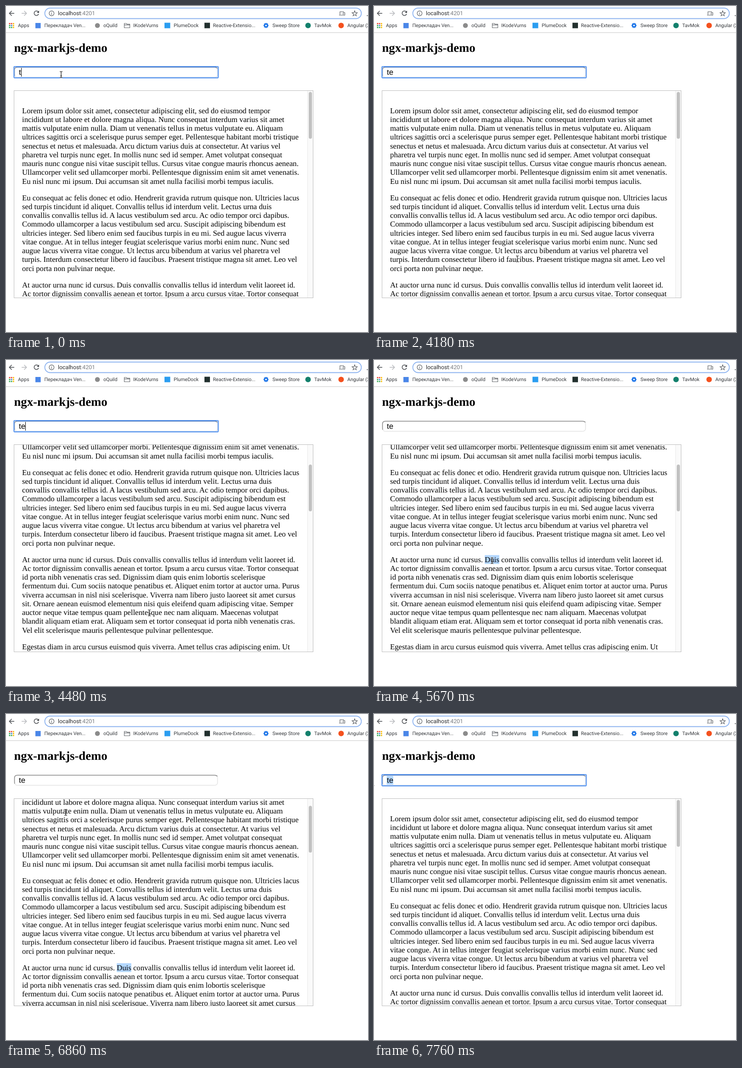
An HTML page with a canvas that plays this animation: 788 by 711 pixels, repeating every 8000 ms.

```html
<!DOCTYPE html>
<html lang="en">
<head>
<meta charset="utf-8">
<title>ngx-markjs-demo</title>
<style>
  html, body { margin: 0; width: 100%; height: 100%; overflow: hidden; background: #fff; }
  canvas { display: block; }
</style>
</head>
<body>
<canvas id="stage" width="788" height="711"></canvas>
<script>
const ctx = document.getElementById('stage').getContext('2d');
const LOOP = 8000;
const SERIF = '16.75px "Liberation Serif", "Times New Roman", serif';
const SANS = '16.75px "Liberation Sans", Arial, sans-serif';
const UI = 'Roboto, sans-serif';
const SELECTION = '#b3d7ff';
const LINE = 19.25;
const GAP = 16.75;

const paragraphs = [
`Lorem ipsum dolor ssit amet, consectetur adipiscing elit, sed do eiusmod tempor
incididunt ut labore et dolore magna aliqua. Nunc consequat interdum varius sit amet
mattis vulputate enim nulla. Diam ut venenatis tellus in metus vulputate eu. Aliquam
ultrices sagittis orci a scelerisque purus semper eget. Pellentesque habitant morbi tristique
senectus et netus et malesuada. Arcu dictum varius duis at consectetur. At varius vel
pharetra vel turpis nunc eget. In mollis nunc sed id semper. Amet volutpat consequat
mauris nunc congue nisi vitae suscipit tellus. Cursus vitae congue mauris rhoncus aenean.
Ullamcorper velit sed ullamcorper morbi. Pellentesque dignissim enim sit amet venenatis.
Eu nisl nunc mi ipsum. Dui accumsan sit amet nulla facilisi morbi tempus iaculis.`,
`Eu consequat ac felis donec et odio. Hendrerit gravida rutrum quisque non. Ultricies lacus
sed turpis tincidunt id aliquet. Convallis tellus id interdum velit. Lectus urna duis
convallis convallis tellus id. A lacus vestibulum sed arcu. Ac odio tempor orci dapibus.
Commodo ullamcorper a lacus vestibulum sed arcu. Suscipit adipiscing bibendum est
ultricies integer. Sed libero enim sed faucibus turpis in eu mi. Sed augue lacus viverra
vitae congue. At in tellus integer feugiat scelerisque varius morbi enim nunc. Nunc sed
augue lacus viverra vitae congue. Ut lectus arcu bibendum at varius vel pharetra vel
turpis. Interdum consectetur libero id faucibus. Praesent tristique magna sit amet. Leo vel
orci porta non pulvinar neque.`,
`At auctor urna nunc id cursus. Duis convallis convallis tellus id interdum velit laoreet id.
Ac tortor dignissim convallis aenean et tortor. Ipsum a arcu cursus vitae. Tortor consequat
id porta nibh venenatis cras sed. Dignissim diam quis enim lobortis scelerisque
fermentum dui. Cum sociis natoque penatibus et. Aliquet enim tortor at auctor urna. Purus
viverra accumsan in nisl nisi scelerisque. Viverra nam libero justo laoreet sit amet cursus
sit. Ornare aenean euismod elementum nisi quis eleifend quam adipiscing vitae. Semper
auctor neque vitae tempus quam pellentesque nec nam aliquam. Maecenas volutpat
blandit aliquam etiam erat. Aliquam sem et tortor consequat id porta nibh venenatis cras.
Vel elit scelerisque mauris pellentesque pulvinar pellentesque.`,
`Egestas diam in arcu cursus euismod quis viverra. Amet tellus cras adipiscing enim. Ut`
].map(p => p.split('\n'));

// Step tracks: each entry holds until the next time.
const pointer = [
  [0, 120, 149], [3430, 127, 163], [3580, 166, 244], [3730, 222, 362], [3880, 274, 470],
  [4030, 304, 536], [4180, 312, 551], [4780, 310, 546], [4930, 297, 518], [5080, 278, 479],
  [5230, 263, 449], [5380, 257, 437], [6270, 250, 424], [6410, 216, 362], [6560, 170, 284],
  [6710, 138, 228], [6860, 130, 214], [7160, 125, 190], [7310, 112, 156], [7460, 72, 152],
  [7610, 22, 150], [7760, -8.8, 146.5]
];
const scrolling = [[0, 0], [4330, 90], [4480, 173], [6560, 160], [6710, 112], [6860, 55], [7010, 14], [7160, 0]];
const caretToggles = [300, 740, 1190, 1340, 1930, 2380, 2830, 3430, 3880, 4330, 4780, 5230, 5530, 7460, 7610];

const at = (track, t) => track.filter(k => k[0] <= t).pop().slice(1);

function text(str, x, y, font, color = '#000') {
  ctx.font = font;
  ctx.fillStyle = color;
  ctx.fillText(str, x, y);
}

function box(x, y, w, h, color) {
  ctx.fillStyle = color;
  ctx.fillRect(x, y, w, h);
}

function rounded(x, y, w, h, r) {
  ctx.beginPath();
  ctx.roundRect(x, y, w, h, r);
}

function dot(x, y, r, color) {
  ctx.fillStyle = color;
  ctx.beginPath();
  ctx.arc(x, y, r, 0, 7);
  ctx.fill();
}

function stroke(path, color, width) {
  ctx.strokeStyle = color;
  ctx.lineWidth = width;
  ctx.stroke(new Path2D(path));
}

function drawNavigation() {
  stroke('M18 16H7.5M12.5 10.8L7.3 16L12.5 21.2', '#4a4d51', 1.5);
  stroke('M34 16H44.5M39.5 10.8L44.7 16L39.5 21.2', '#b9bbbe', 1.5);
  stroke('M70.2 12.6A5 5 0 1 0 71 17.2', '#4a4d51', 1.5);
  ctx.fillStyle = '#4a4d51';
  ctx.fill(new Path2D('M72 10V15H67Z'));

  rounded(84.5, 4.5, 689, 23, 11.5);
  ctx.strokeStyle = '#8eb4f0';
  ctx.lineWidth = 1.8;
  ctx.stroke();
  stroke('M104.6 16A5.3 5.3 0 1 1 94 16A5.3 5.3 0 1 1 104.6 16M99.3 15.2V19M99.3 12.8V14', '#5f6368', 1.2);
  text('localhost', 113, 20, `12.3px ${UI}`, '#27292c');
  const width = ctx.measureText('localhost').width;
  text(':4201', 113 + width, 20, `12.3px ${UI}`, '#777b80');

  stroke('M736 12.5H727V19M725 20H733M734 14.5H737.5V20H734Z', '#5f6368', 1.2);
  const star = Array.from({ length: 10 }, (_, i) => {
    const r = i % 2 ? 2.6 : 6, a = i * Math.PI / 5;
    return [759 + r * Math.sin(a), 16.5 - r * Math.cos(a)].join(' ');
  });
  stroke('M' + star.join('L') + 'Z', '#5f6368', 1.2);
  stroke('M785 21H788', '#5f6368', 1.3);
}

function drawBookmarks() {
  const colors = ['#ea4335', '#ea4335', '#fbbc05', '#34a853', '#4285f4', '#fbbc05', '#34a853', '#34a853', '#fbbc05'];
  colors.forEach((c, i) => box(6.5 + i % 3 * 4.2, 37 + Math.floor(i / 3) * 4.2, 2.8, 2.8, c));
  box(64, 37, 11.5, 11.5, '#4a86e8');
  dot(199, 42.5, 5.3, '#8b8b8b');
  stroke('M257.5 47.5V38H262L263.5 39.7H269.5V47.5ZM257.5 41.3H269.5', '#6b6e72', 1.2);
  box(345, 36.5, 12.5, 12, '#2b9df0');
  box(432, 36.5, 12, 12, '#22302e');
  for (let i = 0; i < 8; i++) {
    const a = i * Math.PI / 4;
    dot(566 + 4.4 * Math.cos(a), 42.5 + 4.4 * Math.sin(a), 1.3, '#1a73e8');
  }
  dot(566, 42.5, 4.4, '#1a73e8');
  dot(566, 42.5, 1.8, '#fff');
  dot(657.5, 42.5, 6, '#12806c');
  dot(729.5, 42.5, 6, '#f4511e');

  const labels = [
    ['Apps', 26], ['Перекладач Ven...', 83.5], ['oQuild', 212], ['IKodeVurns', 277],
    ['PlumeDock', 365], ['Reactive-Extensio...', 450.5], ['Sweep Store', 580],
    ['TavMok', 671], ['Angular (2', 743]
  ];
  for (const [label, x] of labels) text(label, x, 46.3, `10.65px ${UI}`, '#34373b');
  box(0, 57.5, 788, 1, '#c6c6c6');
}

function drawInput(t) {
  const focused = t < 5530 || t >= 7460;
  const value = t < 1340 ? 't' : 'te';
  rounded(18.5, 133.5, 442, 22, 6);
  ctx.strokeStyle = '#e4e4e4';
  ctx.lineWidth = 1.5;
  ctx.stroke();
  stroke('M19 152Q18.5 151 18.5 148V139.5Q18.5 133.5 24.5 133.5H454.5Q458.5 133.5 460 136', '#8a8a8a', 1.5);
  if (focused) {
    rounded(17.4, 132.2, 444.6, 24.4, 1.5);
    ctx.strokeStyle = '#6ba1f1';
    ctx.lineWidth = 2.6;
    ctx.stroke();
    stroke('M22 132.9H458', '#3d7ad6', 1.5);
  }
  ctx.font = SANS;
  const width = ctx.measureText(value).width;
  if (t >= 7610) box(27.5, 135, width + 0.5, 19, SELECTION);
  text(value, 28, 150.4, SANS);
  const caretOn = caretToggles.filter(k => k <= t).length % 2 === 0;
  if (caretOn) box(Math.round(28 + width), 135, 1, 19, '#000');
}

function drawArticle(t) {
  const [scroll] = at(scrolling, t);
  const selected = t >= 5670 && t < 7460;
  ctx.save();
  ctx.beginPath();
  ctx.rect(18, 185, 650, 451);
  ctx.clip();
  let y = 233.6 - scroll;
  for (const lines of paragraphs) {
    for (const line of lines) {
      const start = line.indexOf('Duis convallis');
      if (selected && start > 0) {
        ctx.font = SERIF;
        const left = ctx.measureText(line.slice(0, start)).width;
        box(35 + left, y - 15.1, ctx.measureText('Duis').width, LINE, SELECTION);
      }
      text(line, 35, y, SERIF);
      y += LINE;
    }
    y += GAP;
  }
  box(656, 185, 12, 452, '#fafafa');
  box(656, 185, 1, 452, '#e8e8e8');
  rounded(659, 187.5 + scroll * 0.2335, 7, 102, 3.5);
  ctx.fillStyle = '#c1c1c1';
  ctx.fill();
  ctx.restore();
  ctx.strokeStyle = '#bdbdbd';
  ctx.lineWidth = 1;
  ctx.strokeRect(17.5, 184.5, 651, 452);
}

function drawPointer(t) {
  const [x, y] = at(pointer, t);
  ctx.save();
  ctx.translate(x, y);
  if (t >= 7760) {
    const arrow = 'M0 0V14L3.3 11L5.5 16L7.5 15L5.3 10.3L9.8 10Z';
    ctx.fill(new Path2D(arrow));
    stroke(arrow, '#bbb', 1);
  } else {
    const beam = 'M-3 -6H-1.2L0 -5L1.2 -6H3M0 -5V6M-3 7H-1.2L0 6L1.2 7H3M-1.6 3H1.6';
    stroke(beam, 'rgba(255,255,255,.8)', 2.8);
    stroke(beam, '#111', 1.2);
  }
  ctx.restore();
}

function draw(t) {
  box(0, 0, 788, 711, '#fff');
  drawNavigation();
  drawBookmarks();
  text('ngx-markjs-demo', 17.5, 100.3, 'bold 26.7px "Liberation Serif", "Times New Roman", serif');
  drawInput(t);
  drawArticle(t);
  drawPointer(t);
}

ctx.textRendering = 'geometricPrecision';
const begin = performance.now();
function tick() {
  draw((performance.now() - begin) % LOOP);
  requestAnimationFrame(tick);
}
tick();
</script>
</body>
</html>
```
